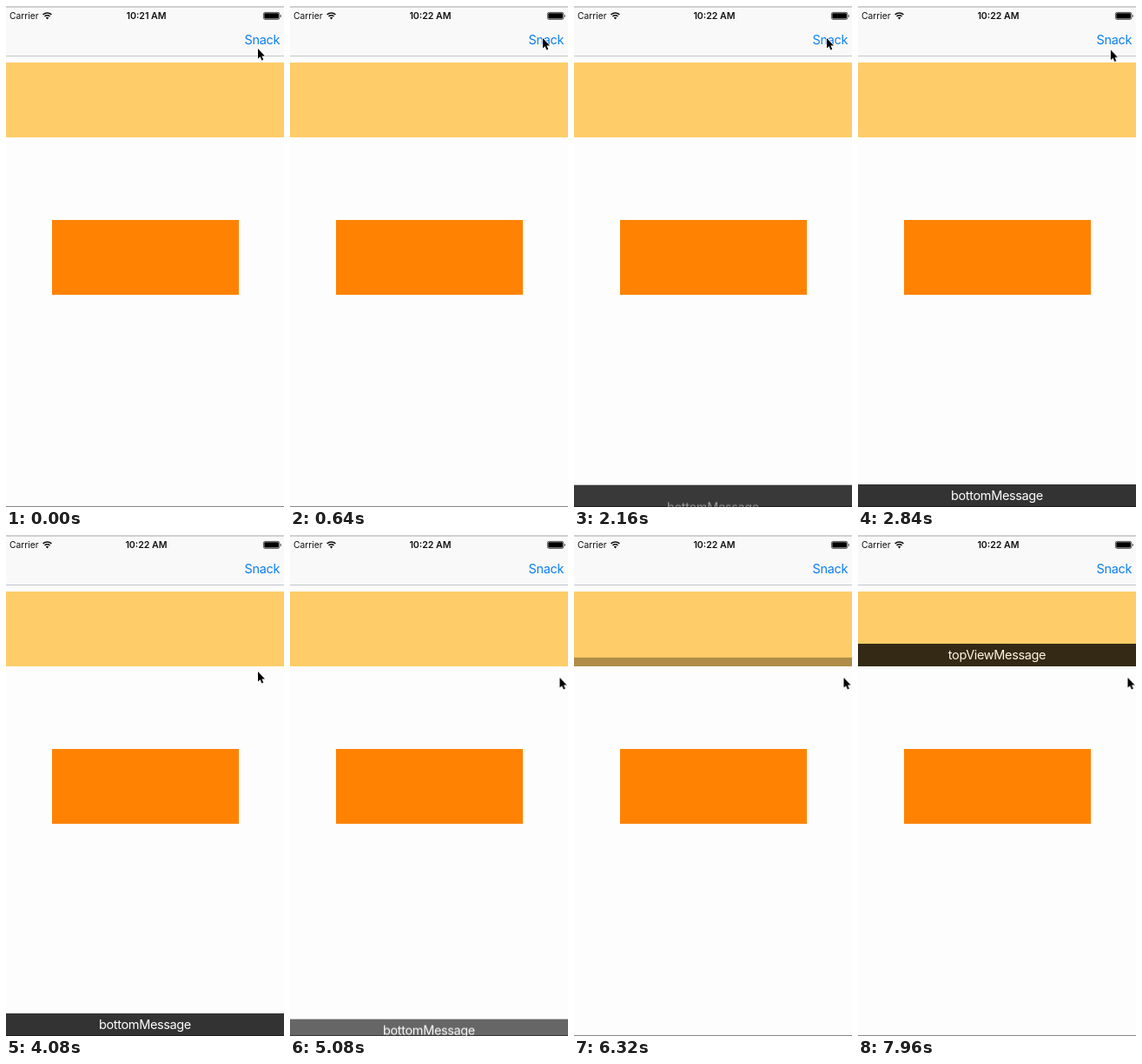
An HTML page for the animation above (8 s loop, 320 by 576 pixels).

```html
<!DOCTYPE html>
<html lang="en">
<head>
<meta charset="utf-8">
<title>Snack messages</title>
<style>
  html, body { margin: 0; width: 100%; height: 100%; overflow: hidden; }
  body { background: #fdfdfd; font-family: Inter, Roboto, "Liberation Sans", sans-serif; }

  .stage { position: relative; width: 320px; height: 576px; overflow: hidden; background: #fdfdfd; }
  .stage * { position: absolute; box-sizing: border-box; white-space: nowrap; }

  .nav { left: 0; top: 0; width: 320px; height: 58px; background: #f9f9f9;
         border-top: 2px solid #d0d0d2; border-bottom: 1px solid #c3c5cc; }
  .floor { left: 0; bottom: 0; width: 320px; height: 1px; background: #858585; }
  .banner { left: 0; top: 65px; width: 320px; height: 86px; overflow: hidden; background: #fecd69; }
  .card { left: 53px; top: 246px; width: 215px; height: 86px; background: #ff8202; }

  .status { top: 4px; height: 15px; line-height: 15px; font-size: 10.3px; color: #111; }
  .carrier { left: 4px; }
  .clock { left: 111.5px; width: 100px; text-align: center; font-size: 10.6px; font-weight: 600; }
  .icons { left: 0; top: 0; }

  .snack { right: 5px; top: 29px; line-height: 20px; font-size: 14.5px;
           letter-spacing: -.025em; color: #0c7ff2; }

  .bar { left: 0; bottom: 0; width: 320px; height: 26px; overflow: hidden; background: #000; opacity: 0; }
  .label { left: 0; top: 0; width: 320px; line-height: 26px; text-align: center;
           font-size: 14.5px; letter-spacing: -.025em; color: #fff; }

  .cursor { left: 0; top: 0; overflow: visible; }

  /* One shared 8 s timeline: 1% = 80 ms */
  .old, .new, .snack, .bar, .label, .cursor { animation: 8s ease-in-out infinite; }
  .old { animation-name: before-minute; }
  .new { animation-name: after-minute; }
  .snack { animation-name: press; }
  .cursor { animation-name: point; }
  .low { animation-name: low-bar; }
  .low .label { animation-name: low-label; }
  .high { animation-name: high-bar; }
  .high .label { animation-name: high-label; }

  @keyframes before-minute {
    0% { opacity: 1; animation-timing-function: step-end; }
    4%, 100% { opacity: 0; }
  }
  @keyframes after-minute {
    0% { opacity: 0; animation-timing-function: step-end; }
    4%, 100% { opacity: 1; }
  }
  @keyframes press {
    0% { opacity: 1; animation-timing-function: step-end; }
    15%, 17.25% { opacity: .15; }
    28.25%, 100% { opacity: 1; }
  }
  @keyframes point {
    0%, .4% { transform: translate(290px, 49px); }
    8%, 33% { transform: translate(291px, 37px); }
    43.75%, 51.375% { transform: translate(290px, 157px); }
    56.5%, 100% { transform: translate(310.5px, 164px); }
  }
  @keyframes low-bar {
    0%, 18.625% { transform: translateY(26px); opacity: 0; }
    28.125%, 59.625% { transform: none; opacity: .8; }
    70.75%, 100% { transform: translateY(26px); opacity: 0; }
  }
  @keyframes low-label {
    0%, 18.75% { transform: translateY(26px); opacity: 0; }
    35%, 100% { transform: none; opacity: 1; }
  }
  @keyframes high-bar {
    0%, 74.875% { transform: translateY(26px); opacity: 0; }
    84.375%, 100% { transform: none; opacity: .8; }
  }
  @keyframes high-label {
    0%, 74.875% { transform: translateY(26px); opacity: 0; }
    91.125%, 100% { transform: none; opacity: 1; }
  }
</style>
</head>
<body>
<div class="stage">
  <div class="nav"></div>
  <div class="status carrier">Carrier</div>
  <div class="status clock old">10:21 AM</div>
  <div class="status clock new">10:22 AM</div>
  <svg class="icons" width="320" height="24">
    <g fill="none" stroke="#111" stroke-width="1.5">
      <path d="M42.6 9.9a7.1 7.1 0 0 1 9.8 0M44.5 12a4.4 4.4 0 0 1 6 0"/>
    </g>
    <path d="M47.5 15.4l-1.7-1.8a2.4 2.4 0 0 1 3.4 0z" fill="#111"/>
    <rect x="296.4" y="7.4" width="18.4" height="8" rx="1.8" fill="none" stroke="#111" stroke-width=".7"/>
    <rect x="297.3" y="8.3" width="16.6" height="6.2" rx="1" fill="#000"/>
    <path d="M315.8 9.9a1.7 1.7 0 0 1 0 3z" fill="#111"/>
  </svg>
  <div class="snack">Snack</div>
  <div class="banner">
    <div class="bar high"><div class="label">topViewMessage</div></div>
  </div>
  <div class="card"></div>
  <div class="floor"></div>
  <div class="bar low"><div class="label">bottomMessage</div></div>
  <svg class="cursor" width="12" height="18">
    <path d="M0 0V11.6L2.6 9.2 4.4 13.6 6.3 12.8 4.5 8.5H8z" fill="#000"
          stroke="#fff" stroke-width="1.4" stroke-linejoin="round" paint-order="stroke"/>
  </svg>
</div>
</body>
</html>
```
